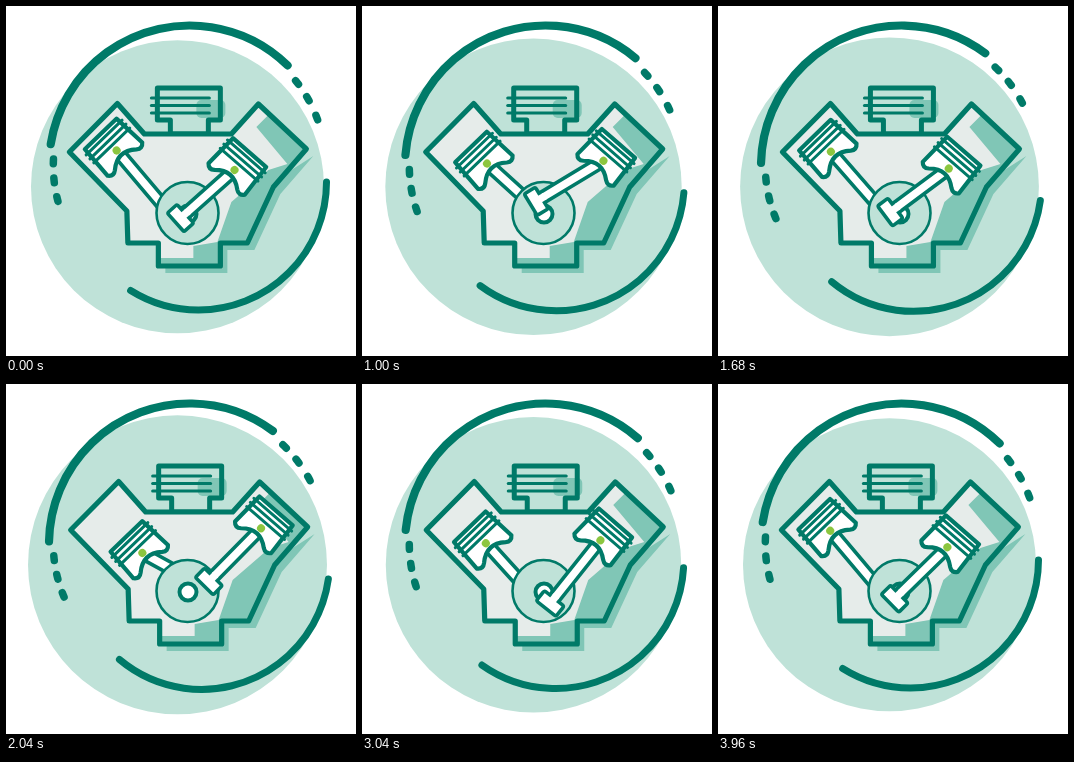
Animation of 350 by 350 pixels, one loop 4 s. Source, as an HTML page with a canvas:

```html
<!DOCTYPE html>
<html lang="en">
<head>
<meta charset="utf-8">
<title>Engine</title>
<style>
html, body { margin: 0; width: 100%; height: 100%; overflow: hidden; background: #fff; }
canvas { display: block; width: 350px; height: 350px; }
</style>
</head>
<body>
<canvas id="stage" width="350" height="350"></canvas>
<script>
const ctx = document.getElementById('stage').getContext('2d');
const LOOP = 4000, TURN = 800, TAU = Math.PI * 2;
const DARK = '#007a68', PALE = '#bfe2d8', MID = '#80c6b6', GREY = '#e6ecea', DOT = '#8cc63f';
const rad = d => d * Math.PI / 180;

const BODY = [[64, 146], [112, 97.5], [139, 128], [226, 128], [253, 98], [301, 143],
  [268, 181], [242, 237], [215, 237], [215, 260], [153, 260], [153, 237], [122.5, 237], [121.5, 205]];
const SHADE = [[264, 108], [301, 143], [268, 181], [242, 237], [215, 237], [215, 260],
  [153, 260], [153, 252], [188, 252], [188, 240], [212, 236], [226, 196], [263, 164], [282, 158], [251, 121]];
const COVER = [[152, 82], [215, 82], [215, 114], [203, 114], [203, 128], [165, 128], [165, 114], [152, 114]];

function poly(points) {
  ctx.beginPath();
  points.forEach(p => ctx.lineTo(p[0], p[1]));
  ctx.closePath();
}

function paint(fill, width) {
  if (fill) { ctx.fillStyle = fill; ctx.fill(); }
  if (width) { ctx.strokeStyle = DARK; ctx.lineWidth = width; ctx.stroke(); }
}

function arc(x, y, r, from, to, width) {
  ctx.beginPath();
  ctx.arc(x, y, r, rad(from), rad(to));
  paint(null, width);
}

function disc(x, y, r, fill, width) {
  ctx.beginPath();
  ctx.arc(x, y, r, 0, TAU);
  paint(fill, width);
}

function line(x1, y1, x2, y2, width) {
  ctx.beginPath();
  ctx.moveTo(x1, y1);
  ctx.lineTo(x2, y2);
  paint(null, width);
}

function turned(x, y, angle, draw) {
  ctx.save();
  ctx.translate(x, y);
  ctx.rotate(angle);
  draw();
  ctx.restore();
}

function drawRing(swing) {
  disc(171.5, 180.8, 146.5 + 3 * swing, PALE);
  turned(183.5, 160, rad(-8 * swing), () => {
    arc(0, 0, 140.5, 189, 314.3, 8.2);
    for (const a of [-37.8, -29.6, -20.8, 166, 174, 182]) arc(0, 0, 136.2, a - 1, a + 1, 7.5);
  });
  turned(184, 199, rad(8 * swing), () => arc(8.5, -23, 128, 0, 122, 7));
}

function drawBlock() {
  ctx.save();
  ctx.translate(7, 7);
  poly(BODY.slice(5, 12));
  paint(MID);
  ctx.restore();

  poly(COVER);
  paint(PALE);
  ctx.beginPath();
  ctx.roundRect(191, 94, 29, 18, 5);
  paint(MID);
  poly(COVER);
  paint(null, 5);
  for (const y of [92, 99.5, 107]) line(146, y, 204, y, 3);

  poly(BODY);
  paint(GREY);
  poly(SHADE);
  paint(MID);
  poly(BODY);
  paint(null, 5.2);
}

function drawRod(a, b) {
  const angle = Math.atan2(b.y - a.y, b.x - a.x);
  const length = Math.hypot(b.x - a.x, b.y - a.y);
  turned(a.x, a.y, angle, () => {
    ctx.beginPath();
    ctx.rect(0, -5.5, length, 11);
    paint('#fff', 3.6);
  });
}

function drawCap(a, b) {
  turned(b.x, b.y, Math.atan2(b.y - a.y, b.x - a.x), () => {
    ctx.beginPath();
    ctx.roundRect(-6.5, -12.5, 13, 25, 2);
    paint('#fff', 3.6);
    ctx.fillStyle = '#fff';
    ctx.fillRect(-10, -3.7, 7, 7.4);
  });
}

function drawPiston(p, angle) {
  turned(p.x, p.y, angle, () => {
    ctx.beginPath();
    ctx.moveTo(-22, -23);
    ctx.lineTo(22, -23);
    ctx.lineTo(24, 12);
    ctx.quadraticCurveTo(20, 17, 15, 13);
    ctx.quadraticCurveTo(0, 0, -15, 13);
    ctx.quadraticCurveTo(-20, 17, -24, 12);
    ctx.closePath();
    paint('#fff', 4.2);
    for (const y of [-18, -12.5, -7]) line(-25, y, 25, y, 3);
    disc(0, 0, 4, DOT);
  });
}

function drawCrank(t) {
  const turn = TAU * t / TURN;
  const wave = (lag, n = 1) => Math.cos(n * (turn - rad(lag)));
  const spin = turn + rad(140 + 21 * wave(290));
  const left = {
    x: 125 + 13 * wave(187) - 1.5 * wave(187, 2),
    y: 158.5 + 12.5 * wave(193) - 2 * wave(193, 2)
  };
  const right = { x: 242 + 13.5 * wave(183), y: 154 - 10 * wave(185) };
  const leftPin = { x: 177 + 12 * Math.cos(spin), y: 203 + 15 * Math.sin(spin) };
  const rightPin = { x: 188 + 16 * Math.cos(spin), y: 203.5 + 16 * Math.sin(spin) };

  drawRod(left, leftPin);
  drawPiston(left, rad(-44));
  disc(181.5, 207, 31, PALE, 2.6);
  disc(182, 208, 8.5, '#fff', 4);
  drawRod(right, rightPin);
  drawCap(right, rightPin);
  drawPiston(right, rad(41));
}

function render(t) {
  ctx.clearRect(0, 0, 350, 350);
  ctx.lineJoin = ctx.lineCap = 'round';
  drawRing(.5 - .5 * Math.cos(TAU * (t + 80) / LOOP));
  ctx.save();
  ctx.translate(.7 * Math.sin(TAU * t / LOOP - 2), 0);
  drawBlock();
  ctx.restore();
  drawCrank(t);
}

const start = performance.now();
function tick() {
  render((performance.now() - start) % LOOP);
  requestAnimationFrame(tick);
}
tick();
</script>
</body>
</html>
```
